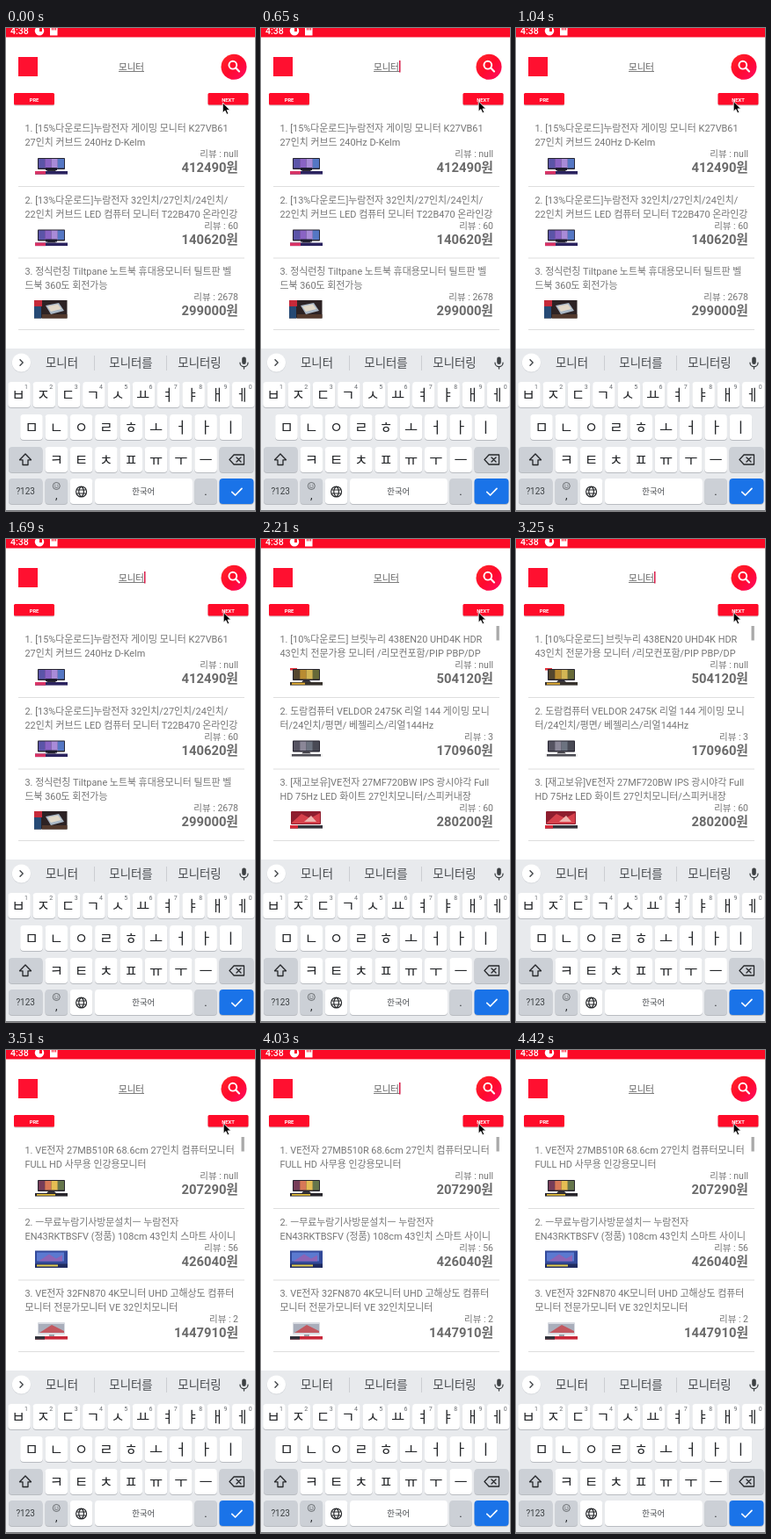
Animation, 283 px wide and 550 px high, one loop 4.55 s. Source, as an HTML page:

```html
<!DOCTYPE html>
<html lang="ko">
<head>
<meta charset="utf-8">
<title>모니터 검색</title>
<style>
  html, body { margin: 0; width: 100%; height: 100%; overflow: hidden; background: #fff; }
  svg { display: block; width: 283px; height: 550px; }
  text { font-family: Roboto, "Noto Sans CJK KR", "Noto Sans CJK", sans-serif; white-space: pre; }
</style>
</head>
<body>
<svg id="stage" viewBox="0 0 283 550" xmlns="http://www.w3.org/2000/svg">
  <defs>
    <linearGradient id="round" x1="0" y1="0" x2="1" y2="1">
      <stop offset="0" stop-color="#ff2a2a"/><stop offset=".5" stop-color="#ff0a2c"/><stop offset="1" stop-color="#ff0a66"/>
    </linearGradient>
  </defs>
  <rect width="283" height="550" fill="#fff"/>
  <g id="head"></g>
  <g id="pages"></g>
  <g id="keys"></g>
  <path id="mouse" d="M0 0V11.6L2.7 9.1L4.6 13.3L6.5 12.4L4.7 8.4H8.3Z" fill="#000" stroke="#fff" stroke-width=".8"/>
</svg>
<script>
const LOOP = 4550, BLINK = 870;
const RED = "#fb0a26", GREY = "#757575", INK = "#26282b";
const $ = id => document.getElementById(id);

function add(parent, tag, attrs, text) {
  const el = document.createElementNS("http://www.w3.org/2000/svg", tag);
  for (const k in attrs) el.setAttribute(k, attrs[k]);
  if (text) el.textContent = text;
  return parent.appendChild(el);
}
const box = (g, x, y, width, height, fill, rx = 0) => add(g, "rect", { x, y, width, height, fill, rx });
const disc = (g, cx, cy, r, fill) => add(g, "circle", { cx, cy, r, fill });
const shape = (g, d, fill) => add(g, "path", { d, fill });
const line = (g, d, stroke, width = 1) => add(g, "path", {
  d, stroke, "stroke-width": width, fill: "none", "stroke-linecap": "round", "stroke-linejoin": "round"
});
const label = (g, x, y, size, fill, text, anchor = "start", weight = 400) => add(g, "text", {
  x, y, "font-size": size, fill, "text-anchor": anchor, "font-weight": weight
}, text);

// Header
const head = $("head");
box(head, 0, 0, 283, 10.5, RED);
label(head, 5, 6.8, 10.6, "#fff", "4:38", "start", 500);
disc(head, 38, 3.2, 5.2, "#fff");
box(head, 38, 0, 3, 4, RED);
shape(head, "M50 0H58.5V8.5H50Z", "#fff");
for (const x of [52, 54, 56]) box(head, x, 0, 1, 2.5, RED);
box(head, 14, 33, 22, 22, "#ff1030");
label(head, 142.5, 47.8, 10.5, "#606060", "모니터", "middle");
box(head, 128, 49, 29, .9, "#707070");
const caret = box(head, 157, 37, 1.5, 13.5, "#d81b48");
disc(head, 259, 44.3, 14.5, "url(#round)");
add(head, "circle", { cx: 257.8, cy: 42.2, r: 4.4, fill: "none", stroke: "#fff", "stroke-width": 1.9 });
line(head, "M261.2 45.6L265 49.4", "#fff", 2.1);

function button(x, text) {
  box(head, x, 75, 46, 13.6, "#d0d0d0", 1.5);
  box(head, x, 74, 46, 13.5, "#ff0b29", 1.5);
  label(head, x + 23, 83.6, 5.8, "#fff", text, "middle", 700);
}
button(9, "PRE");
button(229.5, "NEXT");

// Thumbnails, drawn from the top left corner of a 38 x 20 area
function screen(g, colors, strip) {
  box(g, 4, 1, 31, 13, "#25232f", .8);
  colors.forEach((c, i) => box(g, 5 + i * 29 / colors.length, 2, 29 / colors.length + .1, 10.5, c));
  shape(g, "M16 14H23L25 16H14Z", "#34323a");
  box(g, 1, 16, 37, 3.6, strip);
}
const art = {
  violet(g) {
    screen(g, ["#5b54a8", "#8a63c4", "#a98bd8", "#5577c4"], "#2b235f");
    box(g, 1, 16, 12, 3.6, "#d93466");
    box(g, 13, 12, 13, 3, "#1d1c2d");
  },
  desk(g) {
    box(g, 0, 0, 37.5, 20.5, "#2c2224");
    box(g, 0, 0, 9, 7, "#c62a3a");
    box(g, 0, 7, 8, 13.5, "#264a75");
    shape(g, "M13 6L28 3L34 12L19 16Z", "#a9b7c6");
    shape(g, "M15 7L27 4.5L31 10L19 13Z", "#e2d9c9");
    box(g, 9, 16, 28.5, 4.5, "#51382c");
  },
  field(g) {
    box(g, 1, 0, 8, 2.5, "#e2313b");
    screen(g, ["#54462e", "#b98c31", "#d3b654", "#676a38"], "#37322c");
    box(g, 3, 16.7, 15, 2, "#e2ad35");
  },
  grey(g) {
    screen(g, ["#555361", "#8b8798", "#6c7380", "#494a55"], "#f1f1f1");
    box(g, 3, 16.5, 33, 2.5, "#4c4c54");
  },
  ruby(g) {
    box(g, 2, 0, 34, 15, "#8e1d2e", 1);
    shape(g, "M3 13L14 3L24 8L35 2V14H3Z", "#d6404b");
    shape(g, "M17 12L25 5L31 12Z", "#eeb3ae");
    box(g, 1, 16, 37, 3.6, "#34333b");
    box(g, 1, 16, 9, 3.6, "#d52a3a");
  },
  sunset(g) {
    screen(g, ["#763c58", "#d87857", "#e5bd53", "#65764b"], "#27252b");
    box(g, 3, 17, 21, 1.7, "#e6bf3c");
  },
  ocean(g) {
    box(g, 1, 0, 37, 19.5, "#334a9a");
    shape(g, "M3 2H34V12H3Z", "#5b79d0");
    shape(g, "M5 12L17 4L25 9L32 5V12Z", "#8d63b5");
    box(g, 1, 15, 37, 4.5, "#202c61");
    box(g, 3, 16, 24, 2, "#e4cd50");
  },
  bright(g) {
    box(g, 4, 0, 31, 14, "#d8dbe1", 1);
    shape(g, "M5 2H34V12H5Z", "#a9aebb");
    shape(g, "M6 12L20 3L34 10V12Z", "#c25860");
    box(g, 17, 14, 6, 2, "#9da2aa");
    box(g, 1, 16, 37, 3.6, "#c8283a");
    box(g, 1, 16, 11, 3.6, "#31313a");
  }
};

// Result pages: first line, second line, reviews, price, picture
const results = [
  { from: 0, items: [
    ["1. [15%다운로드]누람전자 게이밍 모니터 K27VB61", "27인치 커브드 240Hz D-Kelm", "null", "412490", "violet"],
    ["2. [13%다운로드]누람전자 32인치/27인치/24인치/", "22인치 커브드 LED 컴퓨터 모니터 T22B470 온라인강", "60", "140620", "violet"],
    ["3. 정식런칭 Tiltpane 노트북 휴대용모니터 틸트판 벨", "드북 360도 회전가능", "2678", "299000", "desk"]
  ] },
  { from: 2080, items: [
    ["1. [10%다운로드] 브릿누리 438EN20 UHD4K HDR", "43인치 전문가용 모니터 /리모컨포함/PIP PBP/DP", "null", "504120", "field"],
    ["2. 도람컴퓨터 VELDOR 2475K 리얼 144 게이밍 모니", "터/24인치/평면/ 베젤리스/리얼144Hz", "3", "170960", "grey"],
    ["3. [재고보유]VE전자 27MF720BW IPS 광시야각 Full", "HD 75Hz LED 화이트 27인치모니터/스피커내장", "60", "280200", "ruby"]
  ] },
  { from: 3380, items: [
    ["1. VE전자 27MB510R 68.6cm 27인치 컴퓨터모니터", "FULL HD 사무용 인강용모니터", "null", "207290", "sunset"],
    ["2. ㅡ무료누람기사방문설치ㅡ 누람전자", "EN43RKTBSFV (정품) 108cm 43인치 스마트 사이니", "56", "426040", "ocean"],
    ["3. VE전자 32FN870 4K모니터 UHD 고해상도 컴퓨터", "모니터 전문가모니터 VE 32인치모니터", "2", "1447910", "bright"]
  ] }
];
const pages = results.map(({ items }, n) => {
  const page = add($("pages"), "g", {});
  items.forEach(([first, second, reviews, price, pic], i) => {
    const y = 99 + i * 81.5;
    label(page, 21.5, y + 19.3, 10.9, GREY, first);
    label(page, 21.5, y + 35, 10.9, GREY, second);
    label(page, 264, y + 48, 10.5, GREY, "리뷰 : " + reviews, "end");
    label(page, 264, y + 65, 14.8, "#6a6a6a", price + "원", "end", 700);
    art[pic](add(page, "g", { transform: `translate(32 ${y + 48})` }));
    box(page, 14, y + 81, 257, 1, "#dedede");
  });
  if (n) box(page, 267.5, 99, 3.3, 16.5, "#a9a9a9");
  return page;
});

// Keyboard
const kb = $("keys");
box(kb, 0, 365, 283, 185, "#e8eaed");
box(kb, 0, 549, 283, 1, "#77797c");
disc(kb, 17.5, 381.6, 10.8, "#d5d8dc");
disc(kb, 17.5, 381, 10.6, "#fff");
line(kb, "M16 377.8L19.2 381L16 384.2", "#44474b", 1.4);
["모니터", "모니터를", "모니터링"].forEach((word, i) =>
  label(kb, [63.5, 142, 220][i], 386, 13.4, "#45484c", word, "middle"));
for (const x of [100, 182]) box(kb, x, 373, 1, 17, "#cbced2");
box(kb, 268.2, 374.5, 4.6, 8.5, "#3c4043", 2.3);
line(kb, "M266 381.2A4.5 4.5 0 0 0 275 381.2M270.5 385.8V388", "#3c4043", 1.3);

function key(x, y, w, fill = "#fff", h = 29) {
  box(kb, x, y + 1, w, h, "#b9bcc1", 4);
  box(kb, x, y, w, h, fill, 4);
}
function row(letters, x, y, digits) {
  [...letters].forEach((ch, i) => {
    const cx = x + i * 28.3;
    key(cx - 12.8, y, 25.6);
    label(kb, cx - (digits ? 1 : 0), y + 20.5, 16.5, INK, ch, "middle");
    if (digits) label(kb, cx + 8, y + 7.8, 7, "#666a6f", String((i + 1) % 10), "middle");
  });
}
row("ㅂㅈㄷㄱㅅㅛㅕㅑㅐㅔ", 15, 403, true);
row("ㅁㄴㅇㄹㅎㅗㅓㅏㅣ", 29, 440);
row("ㅋㅌㅊㅍㅠㅜㅡ", 57.3, 477);

const DIM = "#ccd0d6";
key(3, 477, 38.5, DIM);
line(kb, "M22 485L28.5 491.8H25V497.5H19V491.8H15.5Z", INK, 1.3);
key(242.5, 477, 39, DIM);
line(kb, "M259 486H270.5V497H259L254 491.5ZM262 489L267 494M267 489L262 494", INK, 1.3);
key(3, 513, 38.5, DIM);
label(kb, 22.2, 531.3, 10, "#3c4043", "?123", "middle");
key(44.5, 513, 25.6, DIM);
add(kb, "circle", { cx: 57.3, cy: 521.5, r: 4, fill: "none", stroke: "#5d6165", "stroke-width": .9 });
disc(kb, 55.8, 520.6, .6, "#5d6165");
disc(kb, 58.8, 520.6, .6, "#5d6165");
line(kb, "M55.3 522.6Q57.3 525 59.3 522.6", "#5d6165", .8);
label(kb, 57.3, 535.5, 13, INK, ",", "middle");
key(72.8, 513, 25.6);
line(kb, "M85.6 522A6 6 0 1 0 85.6 534A6 6 0 1 0 85.6 522C81.8 525 81.8 531 85.6 534C89.4 531 89.4 525 85.6 522M80.4 526H90.8M80.4 530H90.8", INK, 1.1);
key(101, 513, 111);
label(kb, 156.3, 531.2, 9.4, "#4a4d51", "한국어", "middle");
key(214.3, 513, 25.6, DIM);
label(kb, 227, 532, 13, INK, ".", "middle");
key(242.5, 513, 39, "#1a73e8");
line(kb, "M256.8 528.3L260.6 532L268 524.4", "#fff", 1.7);

function draw() {
  const t = performance.now() % LOOP;
  const now = results.filter(p => t >= p.from).length - 1;
  pages.forEach((p, i) => p.setAttribute("visibility", i === now ? "visible" : "hidden"));
  caret.setAttribute("visibility", t % BLINK >= 500 ? "visible" : "hidden");
  $("mouse").setAttribute("transform", t < 130 ? "translate(246.3 85)" : "translate(247.2 83.5)");
  requestAnimationFrame(draw);
}
draw();
</script>
</body>
</html>
```
